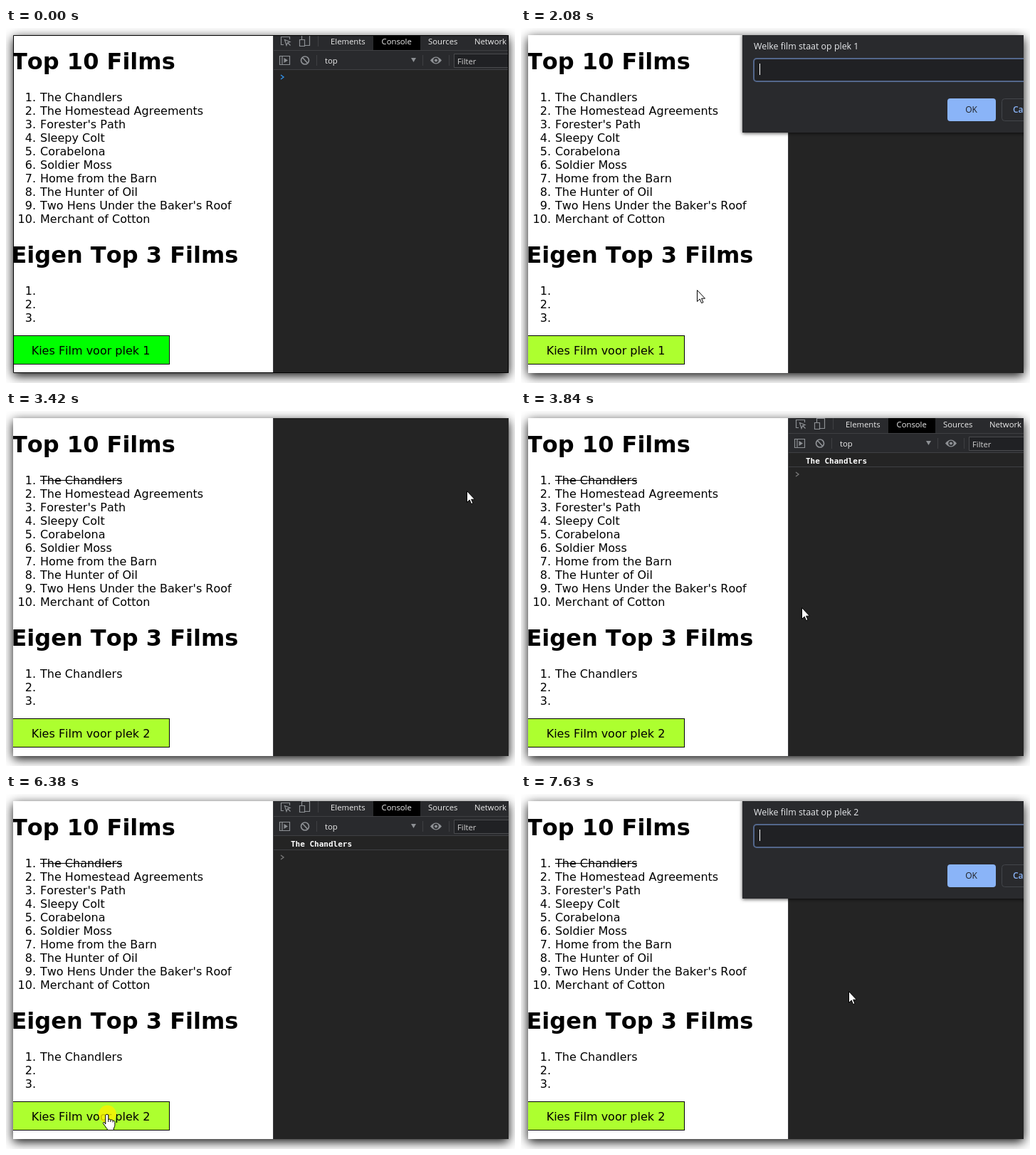
Recreate the animation shown at these times as an HTML page with a canvas. Size 715 px wide and 499 px high, loop 8000 ms.

```html
<!DOCTYPE html>
<html lang="nl">
<head>
<meta charset="utf-8">
<title>Top 10 Films</title>
<style>
html, body { margin: 0; width: 100%; height: 100%; overflow: hidden; background: #fff; }
canvas { display: block; width: 715px; height: 499px; }
</style>
</head>
<body>
<canvas id="stage" width="715" height="499"></canvas>
<script>
const ctx = document.getElementById('stage').getContext('2d');
const LOOP = 8000;
const PAGE = '"DejaVu Sans", sans-serif';
const UI = '"Open Sans", "Noto Sans", sans-serif';
const MONO = '"DejaVu Sans Mono", monospace';
const VIEW = [10, 10, 696, 475];

const FILMS = [
  'The Chandlers', 'The Homestead Agreements', "Forester's Path", 'Sleepy Colt',
  'Corabelona', 'Soldier Moss', 'Home from the Barn', 'The Hunter of Oil',
  "Two Hens Under the Baker's Roof", 'Merchant of Cotton'
];

// Moments (ms) at which the interface changes
const T = {
  border: 70, hover: 740, click1: 1610, ask1: 1780, typed: 2630, over: 2780, ok: 3190,
  close: 3400, tools: 3500, leave: 3900, enter: 4760, click2: 6380, ask2: 6550
};
const BLINK = 540;

// Pointer runs: start time, sampling step, then keys of time, x, y
const RUNS = [
  { start: 660, step: 83, keys: [[660, 139, 476], [905, 131, 455]] },
  { start: 1780, step: 78.5, keys: [
    [1780, 131, 455], [1860, 150, 440], [2100, 300, 330], [2400, 520, 190],
    [2700, 630, 125], [2850, 647, 113], [3400, 647, 113], [3600, 560, 165],
    [3821, 394, 277], [4000, 280, 345], [4290, 170, 400], [4605, 160, 417],
    [4800, 150, 437], [4990, 142, 450]] },
  { start: 6550, step: 75.7, keys: [
    [6550, 142, 450], [6630, 175, 430], [6780, 295, 360], [6930, 415, 298],
    [7075, 460, 278]] }
];

const ARROW = new Path2D('M.5 -.5V15.5L4.2 12L6.6 17.6L9 16.6L6.6 11.2H11.5Z');
const HAND = new Path2D('M-2.2 14V1.9Q-2.2 .3 -.2 .3Q1.8 .3 1.8 1.9V8.2Q2 6.9 3.4 7Q4.8 7.2 4.9 8.6' +
  'Q5.5 7.6 6.8 7.9Q8 8.2 8.1 9.6Q8.8 8.8 9.8 9.3Q10.9 9.9 10.9 11.4' +
  'V15.5Q10.9 17.5 9.3 20V22.5H.2V20.8Q-1.2 19.5 -3 16.5L-5.3 13.4Q-6 12 -4.8 11.3Q-3.4 10.9 -2.2 14Z');
const KNUCKLES = new Path2D('M1.8 8.2V11M4.9 8.6V11M8.1 9.6V11.5');

const between = (t, a, b) => t >= a && t < b;

function rect(x, y, w, h, color) {
  ctx.fillStyle = color;
  ctx.fillRect(x, y, w, h);
}

function text(s, x, y, font, color = '#000', align = 'left') {
  ctx.font = font;
  ctx.fillStyle = color;
  ctx.textAlign = align;
  ctx.fillText(s, x, y);
}

function box(x, y, w, h, r, fill, stroke, line = 1) {
  ctx.beginPath();
  ctx.roundRect(x, y, w, h, r);
  if (fill) { ctx.fillStyle = fill; ctx.fill(); }
  if (stroke) { ctx.strokeStyle = stroke; ctx.lineWidth = line; ctx.stroke(); }
}

function path(d, color, line = 1.2) {
  ctx.strokeStyle = color;
  ctx.lineWidth = line;
  ctx.stroke(new Path2D(d));
}

function disc(x, y, r, color) {
  ctx.beginPath();
  ctx.arc(x, y, r, 0, 7);
  ctx.fillStyle = color;
  ctx.fill();
}

function pointer(t) {
  const run = RUNS.filter(r => t >= r.start).pop();
  if (!run) return null;
  const at = run.start + Math.floor((t - run.start) / run.step) * run.step;
  const keys = run.keys;
  const i = keys.findIndex(k => k[0] > at);
  if (i < 0) {
    const [, x, y] = keys[keys.length - 1];
    return { x, y };
  }
  const [t0, x0, y0] = keys[i - 1], [t1, x1, y1] = keys[i];
  const p = (at - t0) / (t1 - t0);
  return { x: Math.round(x0 + (x1 - x0) * p), y: Math.round(y0 + (y1 - y0) * p) };
}

function drawWindow() {
  rect(0, 0, 715, 499, '#fff');
  ctx.save();
  ctx.shadowColor = 'rgba(0,0,0,.95)';
  ctx.shadowBlur = 14;
  ctx.shadowOffsetY = 4;
  rect(...VIEW, '#fff');
  ctx.restore();
}

function drawPage(t, chosen) {
  const font = '16px ' + PAGE, title = 'bold 32px ' + PAGE;
  ctx.fontKerning = 'none';
  text('Top 10 Films', 8, 58, title);
  FILMS.forEach((film, i) => {
    const y = 103 + 19 * i;
    text(i + 1 + '.', 42, y, font, '#000', 'right');
    text(film, 48, y, font);
  });
  if (chosen) rect(48, 97, 115, 1, '#000');

  text('Eigen Top 3 Films', 7.5, 330, title);
  for (let i = 0; i < 3; i++) text(i + 1 + '.', 42, 375 + 19 * i, font, '#000', 'right');
  if (chosen) text(FILMS[0], 48, 375, font);

  const hover = between(t, T.hover, T.leave) || t >= T.enter;
  rect(8, 432, 222, 41, '#000');
  rect(9, 433, 220, 39, hover ? '#adff2f' : '#0f0');
  text('Kies Film voor plek ' + (chosen ? 2 : 1), 119, 459, font, '#000', 'center');
  ctx.fontKerning = 'auto';
}

function drawIcons() {
  const gray = '#8d9094';
  path('M390 23.5H386.5V12.5H398.5V16', gray);
  path('M391.5 16.5L399 19.5L395.5 20.8L394 24.5ZM395.5 20.5L399.5 24.5', gray);
  path('M415.5 16V10.5H426.5V24.5H420M412.5 16.5H419.5V25.5H412.5Z', gray);
  path('M384.5 39.5H398.5V51.5H384.5ZM388 39.5V51.5', gray);
  ctx.fillStyle = gray;
  ctx.fill(new Path2D('M390.5 42L396 45.5L390.5 49Z'));
  ctx.fill(new Path2D('M569 42H576L572.5 48Z'));
  path('M414.5 45.5a5.5 5.5 0 1 0 11 0a5.5 5.5 0 1 0 -11 0M416.5 41.5L423.7 49.5', gray, 1.7);
  ctx.fill(new Path2D('M596 45.5Q604 35.5 612 45.5Q604 55.5 596 45.5Z'));
  disc(604, 45.5, 3.7, '#292a2d');
  disc(604, 45.5, 2.1, gray);
}

function drawTools(chosen) {
  const font = '11.3px ' + UI, line = '#3f4043';
  rect(376, 10, 330, 48, '#292a2d');
  rect(516, 10, 66, 21, '#000');
  rect(376, 31, 330, 1, line);
  rect(376, 58, 330, 1, line);
  [['Elements', 456], ['Console', 527.5], ['Sources', 593], ['Network', 658]]
    .forEach(([name, x]) => text(name, x, 23, font, '#ececec'));
  rect(438, 10, 1, 16, line);
  [436, 585, 622].forEach(x => rect(x, 38, 1, 15, line));
  text('top', 448, 50, font, '#ececec');
  box(629.5, 36.5, 90, 19, 0, '#202124', '#4a4b4e');
  text('Filter', 634, 51, font, '#d0d0d0');
  drawIcons();
  if (chosen) {
    text(FILMS[0], 400, 74, 'bold 11px ' + MONO, '#fff');
    rect(376, 78, 330, 1, line);
  }
  const y = chosen ? 89 : 69;
  path(`M386 ${y - 3}L390 ${y}L386 ${y + 3}`, chosen ? '#777' : '#3391e8', 1.4);
}

function drawDialog(t, first) {
  ctx.save();
  ctx.shadowColor = 'rgba(0,0,0,.7)';
  ctx.shadowBlur = 5;
  ctx.shadowOffsetY = 1;
  rect(311, 8, 400, 139, '#292a2d');
  ctx.restore();
  text('Welke film staat op plek ' + (first ? 1 : 2), 327, 30, '12.4px ' + UI, '#e8eaed');
  box(327, 43, 400, 32, 4, '#202124', '#53678b', 2);

  const typed = first && t >= T.typed;
  if (typed) text('1', 335, 63, '12.4px ' + UI, '#e8eaed');
  const since = t - (typed ? T.typed : first ? T.ask1 : T.ask2);
  if (Math.floor(since / BLINK) % 2 === 0) rect(typed ? 342 : 335, 50, 1, 16, '#fff');

  const over = first && t >= T.over;
  box(599, 99, 68, 32, 4, over ? '#92b8f8' : '#8ab4f8');
  text('OK', 632.5, 119, '12px ' + UI, '#202124', 'center');
  box(675.5, 99.5, 70, 31, 4, null, '#43464b');
  text('Cancel', 691, 119, '600 12px ' + UI, '#8ab4f8');
}

function drawPointer(t, open) {
  const p = pointer(t);
  if (!p) return;
  const pressed = between(t, T.click1, T.ask1) || between(t, T.click2, T.ask2) ||
    between(t, T.ok, T.ok + 160);
  if (pressed) disc(p.x + .5, p.y, 12.5, 'rgba(250,240,0,.8)');
  const hand = !open && p.x < 229 && p.y > 432;
  ctx.save();
  ctx.translate(p.x, p.y);
  ctx.fillStyle = '#fff';
  ctx.strokeStyle = '#000';
  ctx.lineWidth = 1;
  const shape = hand ? HAND : ARROW;
  ctx.fill(shape);
  ctx.stroke(shape);
  if (hand) ctx.stroke(KNUCKLES);
  ctx.restore();
}

function draw(t) {
  const chosen = t >= T.close;
  const open = between(t, T.ask1, T.close) || t >= T.ask2;
  drawWindow();
  ctx.save();
  ctx.beginPath();
  ctx.rect(...VIEW);
  ctx.clip();
  drawPage(t, chosen);
  rect(375, 10, 1, 475, '#3c3d3f');
  rect(376, 10, 330, 475, '#242424');
  if (!open && !between(t, T.close, T.tools)) drawTools(chosen);
  if (open) drawDialog(t, !chosen);
  drawPointer(t, open);
  ctx.restore();
  if (t < T.border) box(10.5, 10.5, 695, 474, 0, null, '#000');
}

const begin = performance.now();
function frame() {
  draw((performance.now() - begin) % LOOP);
  requestAnimationFrame(frame);
}
frame();
</script>
</body>
</html>
```
